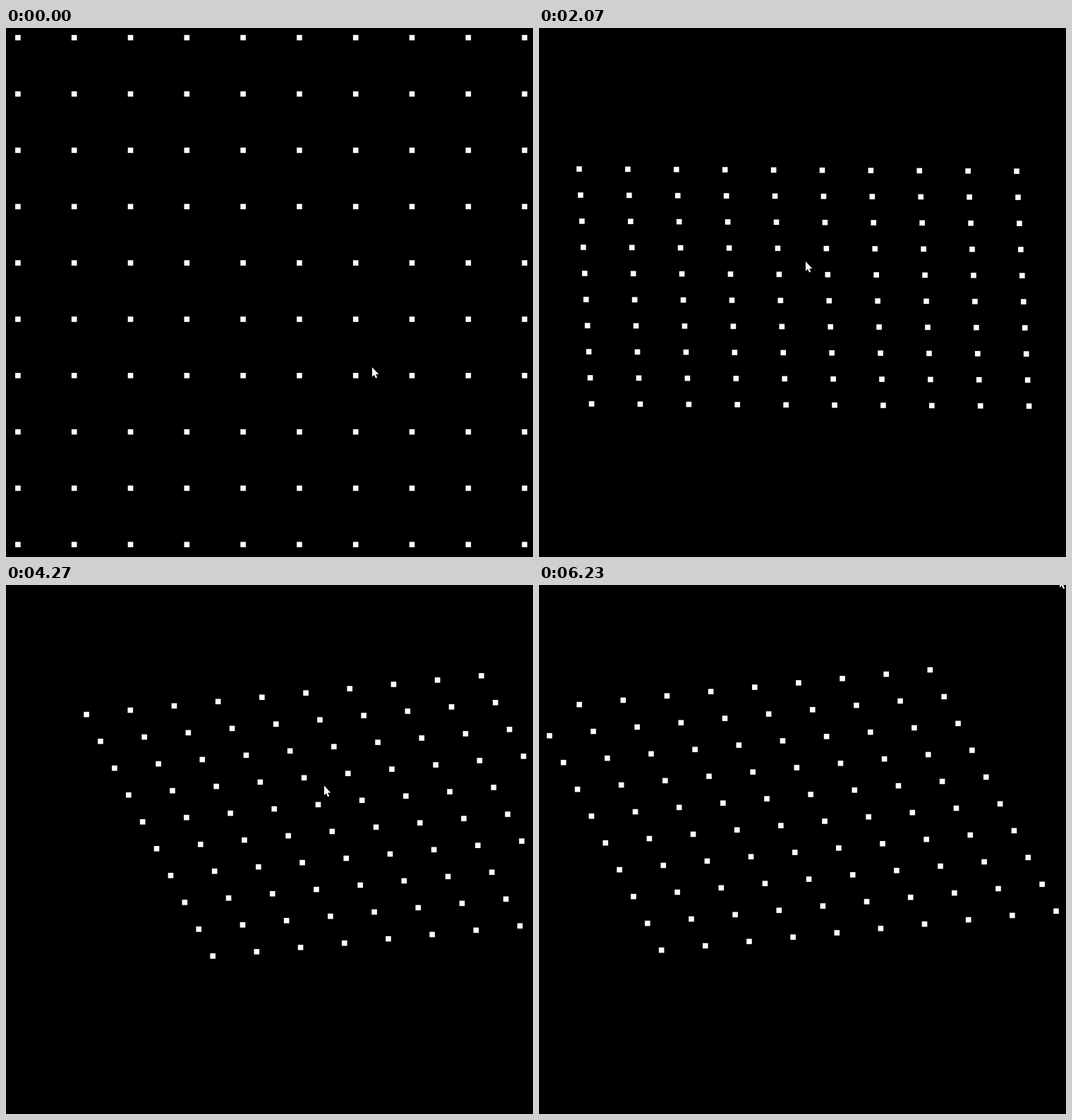
An HTML page with a canvas that plays this animation: 747 by 750 pixels, repeating every 6260 ms.

```html
<!DOCTYPE html>
<html lang="en">
<head>
<meta charset="utf-8">
<title>Rotating dot grid</title>
<style>
  html, body { margin: 0; width: 100%; height: 100%; overflow: hidden; background: #000; }
  canvas { display: block; }
</style>
</head>
<body>
<canvas id="stage" width="747" height="750"></canvas>
<script>
const LOOP = 6260, COUNT = 10, DOT = 7.6;
const ctx = document.getElementById('stage').getContext('2d');

// Grid centre: time, x, y
const centre = [
  [0, 376, 373], [1070, 375.5, 373], [2070, 375.8, 368], [3070, 374.6, 367],
  [3500, 374.6, 367], [3800, 381, 389], [4000, 410, 542], [4270, 483.5, 327.8],
  [4430, 470, 278], [5070, 365, 318], [5200, 364, 319]
];

// Projected column and row steps: time, ux, uy, vx, vy
const axes = [
  [0, 79.8, 0, 0, 79.85], [600, 79.8, -.3, .3, 79.8], [850, 79.8, -3, 3, 79.3],
  [1070, 79.55, -3.4, 5.5, 74.95], [1300, 78, -3, 8, 59.3], [1900, 69.2, 0, 2.5, 38],
  [2070, 68.9, .35, 1.95, 37], [2530, 63, -5, 19, 37], [3070, 62.3, -5.95, 19.5, 38.1],
  [4270, 62.2, -6.1, 19.9, 38.05], [5070, 62.15, -6.15, 19.85, 38]
];

// Pointer tip: time, x, y
const pointer = [
  [0, 519, 481], [300, 516, 440], [630, 520, 470], [1070, 407, 490], [1300, 420, 440],
  [2070, 378, 331], [2400, 420, 553], [3070, 345, 483], [3500, 342.1, 324.2],
  [5070, 332.5, 275.2], [5500, 300, 47], [5740, 110, 300], [5900, 250, 465], [6230, 738, -10]
];
const DRAG = { from: 3500, to: 5070, dx: -32.5, dy: -42.8 };

// Monotone cubic interpolation through the rows of a table
function sample(keys, t) {
  const last = keys.length - 1;
  if (t >= keys[last][0]) return keys[last].slice(1);
  const i = keys.findIndex((k, n) => n < last && t < keys[n + 1][0]);
  const h = keys[i + 1][0] - keys[i][0];
  const p = (t - keys[i][0]) / h;
  return keys[i].slice(1).map((a, n) => {
    const c = n + 1, b = keys[i + 1][c];
    const slope = j => (keys[j + 1][c] - keys[j][c]) / (keys[j + 1][0] - keys[j][0]);
    const tangent = j => {
      if (j === 0 || j === last) return 0;
      const s = slope(j - 1), e = slope(j);
      return s * e > 0 ? 2 * s * e / (s + e) : 0;
    };
    const q = 1 - p;
    return a * (1 + 2 * p) * q * q + b * p * p * (3 - 2 * p)
      + h * p * q * (q * tangent(i) - p * tangent(i + 1));
  });
}

const arrow = new Path2D('M0 0V13.5L3 10.7L5 15.6L7.2 14.7L5.2 10H9.3Z');

function drawPointer(x, y) {
  ctx.save();
  ctx.translate(x, y);
  ctx.strokeStyle = '#000';
  ctx.lineWidth = 2;
  ctx.stroke(arrow);
  ctx.fill(arrow);
  ctx.restore();
}

function draw(t) {
  const [cx, cy] = sample(centre, t);
  const [ux, uy, vx, vy] = sample(axes, t);
  const mid = (COUNT - 1) / 2;
  ctx.fillStyle = '#000';
  ctx.fillRect(0, 0, 747, 750);
  ctx.fillStyle = '#fff';
  for (let r = -mid; r <= mid; r++) {
    for (let c = -mid; c <= mid; c++) {
      const x = cx + c * ux + r * vx, y = cy + c * uy + r * vy;
      ctx.fillRect(x - DOT / 2, y - DOT / 2, DOT, DOT);
    }
  }
  const dragging = t >= DRAG.from && t <= DRAG.to;
  const [px, py] = dragging ? [cx + DRAG.dx, cy + DRAG.dy] : sample(pointer, t);
  drawPointer(px, py);
}

const start = performance.now();
function tick() {
  draw((performance.now() - start) % LOOP);
  requestAnimationFrame(tick);
}
tick();
</script>
</body>
</html>
```
